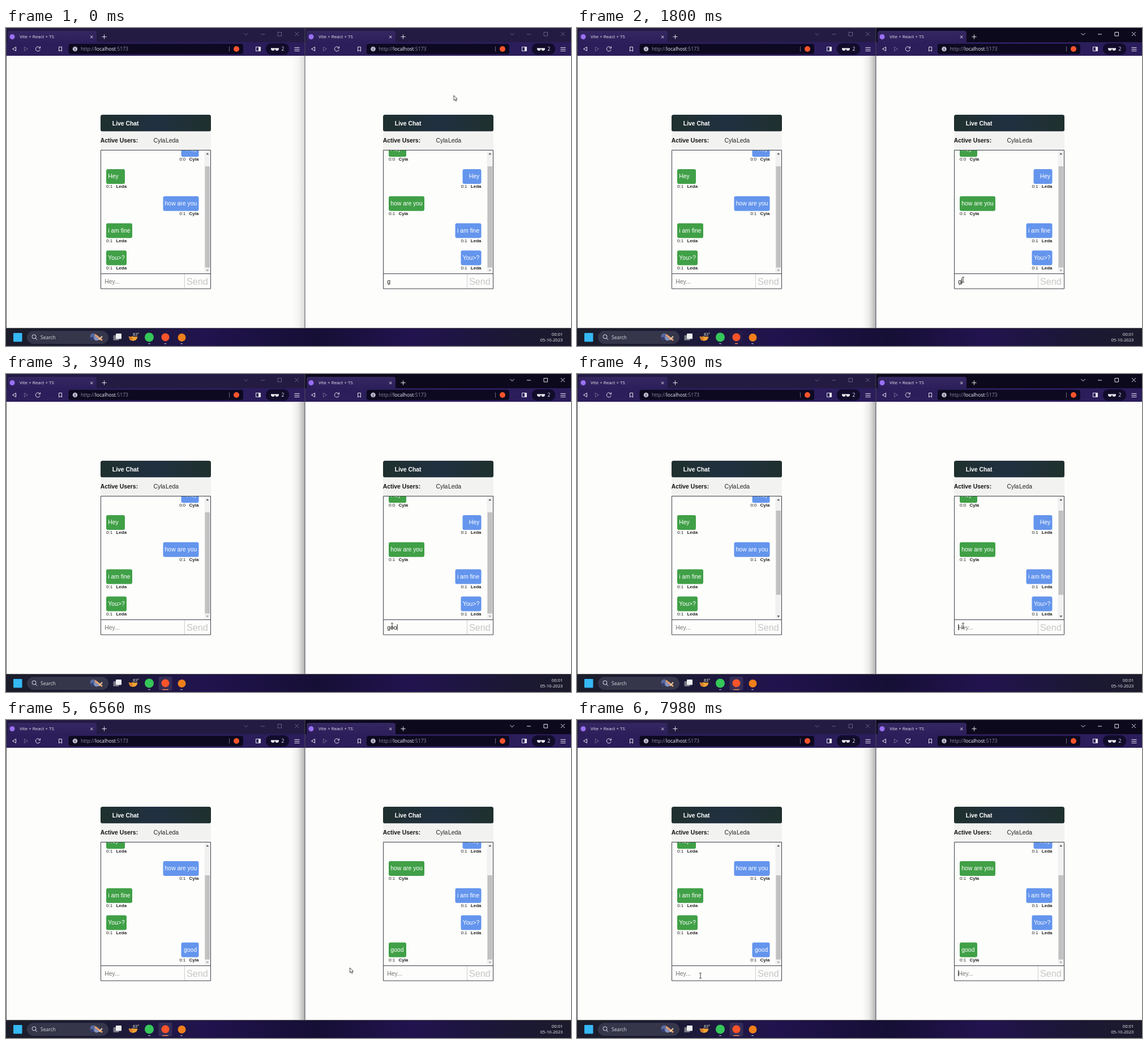
An HTML page for the animation above (8 s loop, 998 by 561 pixels).

```html
<!DOCTYPE html>
<html lang="en">
<head>
<meta charset="utf-8">
<title>Live chat</title>
<style>
html, body { margin: 0; width: 100%; height: 100%; overflow: hidden; background: #fdfdfc; }
svg { display: block; width: 998px; height: 561px; }
text { font: 10.4px "Liberation Sans", Arial, sans-serif; white-space: pre; }
.ui { font-family: "Open Sans", "Noto Sans", sans-serif; }
.bold { font-weight: bold; }
.meta { font-size: 8px; }
.line { fill: none; stroke: #e4e2ee; stroke-width: 1; }
</style>
</head>
<body>
<svg id="stage" viewBox="0 0 998 561" xmlns="http://www.w3.org/2000/svg"></svg>
<script>
const LOOP = 8000;
const FOCUS = 1740, SENT = 5240, SCROLL = [5310, 5690];
const STEP = 47.8;
const USERS = ['Cyla', 'Leda'];
const MIN_WIDTH = [31, 33];

// sender, text, time, bubble width
const MESSAGES = [
  [0, 'Hey', '0:0'],
  [1, 'Hey', '0:1'],
  [0, 'how are you', '0:1', 63],
  [1, 'i am fine', '0:1', 46],
  [1, 'You>?', '0:1', 36],
  [0, 'good', '0:1'],
];
const TYPING = [[0, 'g'], [3460, 'go'], [3720, 'goo'], [4120, 'good'], [SENT, '']];
const CARET_RESETS = [FOCUS, 3460, 3720, 4120, 4940];
const POINTER = [
  [0, 791, 119], [300, 791, 119], [1560, 682, 444], [6240, 682, 444],
  [6560, 607.5, 437], [7480, 218, 451], [LOOP, 218, 451],
];

const rect = (x, y, w, h, fill, r = 0, extra = '') =>
  `<rect x="${x}" y="${y}" width="${w}" height="${h}" rx="${r}" fill="${fill}" ${extra}/>`;
const dot = (x, y, r, fill) => `<circle cx="${x}" cy="${y}" r="${r}" fill="${fill}"/>`;
const path = (d, extra = '') => `<path class="line" d="${d}" ${extra}/>`;
const shape = (d, fill, extra = '') => `<path d="${d}" fill="${fill}" ${extra}/>`;
const text = (x, y, str, fill, cls = '', extra = '') =>
  `<text x="${x}" y="${y}" fill="${fill}" class="${cls}" ${extra}>${str}</text>`;
const size = px => `style="font-size:${px}px"`;
const escapeText = str => str.replace('>', '&gt;');

function controls(id) {
  return `<g id="controls${id}" stroke-opacity=".35">` +
    path('M420.5 9l3.5 3.5l3.500-3.500M450 11h7M480 7.500h6.500v6.500h-6.500zM510 7l7 7M517 7l-7 7') + '</g>';
}

function browser(id, x, width, rightShift) {
  const leftItems =
    rect(3, 5, 157, 22, 'url(#tab)', 4) +
    dot(11, 15.500, 4.5, '#9a70f4') +
    text(24, 18.300, 'Vite + React + TS', '#e6e3f0', 'ui', size(8)) +
    path('M149 13.500l4.500 4.500M153.500 13.500l-4.500 4.500') +
    path('M169.500 15.500h8M173.500 11.500v8') +
    rect(0, 25, width, 24, 'url(#toolbar)') +
    path('M17.500 33.500v7l-6-3.500z') +
    path('M32.500 33.500v7l6-3.500z', 'stroke-opacity=".35"') +
    path('M59.500 34.500a4 4 0 1 0 .7 3.500M60.500 32.500v3h-3') +
    path('M93.500 33.500h5v7.500l-2.500-2l-2.500 2z');
  const barStart = id ? 109 : 110.500, barEnd = 419 + rightShift - x;
  const shift = id ? -1.5 : 0;
  const address =
    rect(barStart, 28, barEnd - barStart, 18, '#0c0920', 4) +
    dot(122 + shift, 37, 4.300, '#bdbac9') +
    rect(121.500 + shift, 36.500, 1, 3, '#17112f') + rect(121.500 + shift, 34.500, 1, 1, '#17112f') +
    text(132 + shift, 40.300, 'http://<tspan fill="#f3f2f8">localhost</tspan>:5173', '#918da6', 'ui', size(8.700));
  const rightItems =
    path('M394.500 32.500v9', 'stroke-opacity=".45"') +
    dot(407, 37, 5, '#fb542b') +
    path('M441.500 33.500h8v7h-8z') + rect(446, 33.500, 3.500, 7, '#e4e2ee') +
    rect(459, 27, 41, 20, '#120c2b', 9) +
    shape('M468 35.500h14v1.500q-.5 3-3.500 3t-3-3h-1q0 3-3 3t-3.500-3z', '#f3f2f8') +
    text(486.500, 40, '2', '#f3f2f8', 'ui', size(8.500)) +
    path('M509.500 34.500h9M509.500 37.500h9M509.500 40.500h9') + controls(id);
  return rect(x, 0, width, 530, '#fdfdfc') +
    rect(x, 0, width, 26, '#231b42', 0, `id="strip${id}"`) +
    `<g transform="translate(${x})">${leftItems}${address}</g>` +
    `<g transform="translate(${rightShift})">${rightItems}</g>`;
}

function message([sender, body, time, width = MIN_WIDTH[sender]], index, viewer) {
  const mine = sender === viewer;
  const y = 201.200 + index * STEP;
  const x = mine ? 340.500 - width : 177;
  const edge = mine ? 340.500 : 177;
  const anchor = mine ? 'text-anchor="end"' : '';
  return rect(x, y, width, 26, mine ? '#6495ed' : '#40a047', 3) +
    text(mine ? edge - 3.300 : edge + 3.300, y + 16.200, escapeText(body), '#fff', '', anchor) +
    text(edge, y + 33.200, `${time}<tspan class="meta bold" dx="6.300" font-weight="bold">${USERS[sender]}</tspan>`,
      '#222', 'meta', anchor);
}

function chat(viewer, x) {
  const list = MESSAGES.map((m, i) =>
    `<g ${i === 5 ? `id="reply${viewer}"` : ''}>${message(m, i, viewer)}</g>`).join('');
  return `<g transform="translate(${x})">` +
    rect(167, 153, 195, 29.500, 'url(#header)', 3.500) +
    text(187.800, 171.700, 'Live Chat', '#fff', 'bold') +
    rect(167, 182.500, 195, 33, '#f2f2f1') +
    text(166.700, 202.200, 'Active Users:', '#151515', 'bold') +
    text(260.500, 202.200, USERS[0], '#222') + text(282, 202.200, USERS[1], '#222') +
    rect(167.500, 215.500, 194, 244.500, '#fdfdfc') +
    `<g clip-path="url(#messages)"><g id="list${viewer}">${list}</g></g>` +
    rect(350.500, 216, 10.500, 217.500, '#f1f1f1') +
    rect(351.500, 244, 8.500, 178, '#c1c1c1', 0, `id="thumb${viewer}"`) +
    shape('M353.300 223.200l2.500-3l2.500 3z', '#505050') +
    shape('M353.300 426.200l2.500 3l2.500-3z', '#a3a3a3', `id="down${viewer}"`) +
    path('M315.500 434v26', 'style="stroke:#cfcfcf"') +
    path('M167 433.500h195M167.500 215.500h194v244.500h-194z', 'style="stroke:#3c4247"') +
    text(319, 452.600, 'Send', '#c6c6c6', '', size(16.200)) +
    text(174.300, 450.500, 'Hey...', '#757575', '', `id="input${viewer}"`) + '</g>';
}

function taskbar() {
  const running = [253, 281.500, 310].map((x, i) =>
    rect(x - 2, 556, 4, 1.500, '#9b9ba8', .7, i === 1 ? 'id="underline"' : '')).join('');
  return rect(0, 530, 998, 31, 'url(#taskbar)') +
    rect(0, 529, 998, 1, '#5d5b55') +
    rect(13, 538, 15.500, 15.500, '#35b8f3', 1) +
    rect(37.500, 535, 143, 21.500, '#35364a', 10.700, 'stroke="#484960" stroke-width=".6"') +
    '<circle class="line" cx="49.500" cy="544.500" r="3.500"/>' + path('M52 547l3 3.500') +
    text(61, 549.300, 'Search', '#d9d9e0', 'ui', size(8.500)) +
    dot(154, 544, 5.500, '#59699f') + dot(160, 547, 4.500, '#8591bf') + dot(152, 548, 3, '#353e70') +
    path('M157 541l13 10', 'style="stroke:#e39b68;stroke-width:3"') +
    path('M164 550l6-6', 'style="stroke:#f2d1ac;stroke-width:2"') +
    rect(189.500, 542, 10, 9, '#777984', 1) + rect(194, 539, 10, 9.500, '#eeeef2', 1) +
    shape('M216.500 544q6 2 9-2q4 2 7-1q1 10-8 11q-6 0-8-8z', '#f2a333') +
    dot(221, 548, 3, '#d9822b') +
    rect(222.500, 535.500, 14, 9, '#1b1935', 4) +
    text(224, 542.700, '83°', '#fff', 'ui', size(7)) +
    rect(269.500, 534, 24, 24, '#fff', 3, 'id="highlight" opacity="0"') +
    dot(253, 545.500, 8, '#35c759') + dot(281.500, 545.500, 7, '#fb542b') + dot(310.500, 546, 7, '#ef7f1a') +
    running +
    text(983.500, 542.800, '00:01', '#f1f1f5', 'ui', `text-anchor="end" ${size(7.700)}`) +
    text(983.500, 553, '05-10-2023', '#f1f1f5', 'ui', `text-anchor="end" ${size(7.700)}`);
}

function gradient(id, stops, attrs = '') {
  return `<linearGradient id="${id}" ${attrs}>` + stops.map(([at, color, alpha = 1]) =>
    `<stop offset="${at}" stop-color="${color}" stop-opacity="${alpha}"/>`).join('') + '</linearGradient>';
}

const $ = id => document.getElementById(id);

$('stage').innerHTML = '<defs>' +
  gradient('tab', [[0, '#352761'], [1, '#2c1e5a']], 'x2="0" y2="1"') +
  gradient('toolbar', [[0, '#2c1e5a'], [1, '#2b1d5b']]) +
  gradient('header', [[0, '#1f302e'], [.5, '#213041'], [1, '#1f302e']]) +
  gradient('taskbar', [[0, '#1b1d2b'], [.18, '#1c1b35'], [.35, '#21134e'], [.55, '#160f35'], [.72, '#22134f'], [.9, '#1b1833'], [1, '#1c1b2c']]) +
  gradient('shadow', [[0, '#000', 0], [.5, '#000', .07], [1, '#000', .3]]) +
  '<clipPath id="messages"><rect x="168" y="216" width="183" height="217"/></clipPath></defs>' +
  browser(0, 0, 528, 0) + chat(0, 0) +
  rect(504, 49, 24, 480, 'url(#shadow)', 0, 'id="shadow-edge"') +
  browser(1, 528, 470, 470) + chat(1, 499) +
  rect(0, 0, 1, 530, '#4d4b51') + rect(527.500, 0, 1, 530, '#4b4956') + taskbar() +
  rect(0, 441.500, 1, 10.500, '#111', 0, 'id="caret"') +
  '<g id="pointer"><g id="arrow">' +
  shape('M0 0v8.800l2-1.900l1.400 3.200l1.500-.7l-1.400-3h2.600z', '#fff', 'stroke="#222" stroke-width=".8"') +
  '</g><g id="beam">' +
  path('M-2 -4.500h1.300l.7 .6l.7-.6h1.300M0 -4v8M-2 4.500h1.300l.7-.6l.7 .6h1.300', 'style="stroke:#222;stroke-width:.9"') +
  '</g></g>';

const clamp = v => Math.min(1, Math.max(0, v));
const ease = v => v * v * (3 - 2 * v);
const show = (id, on) => $(id).style.display = on ? '' : 'none';
const set = (id, attrs) => Object.entries(attrs).forEach(([k, v]) => $(id).setAttribute(k, v));

function pointerAt(t) {
  const i = Math.max(1, POINTER.findIndex(p => p[0] > t));
  const [t0, x0, y0] = POINTER[i - 1], [t1, x1, y1] = POINTER[i];
  const k = ease(clamp((t - t0) / (t1 - t0)));
  return [x0 + (x1 - x0) * k, y0 + (y1 - y0) * k];
}

function draw(t) {
  const active = t >= FOCUS, sent = t >= SENT;

  set('strip1', { fill: active ? '#0d091d' : '#231b42' });
  set('controls1', { 'stroke-opacity': active ? 1 : .35 });
  set('shadow-edge', { opacity: active ? 1 : .45 });
  const grow = ease(clamp((t - FOCUS) / 200));
  const width = 4 + 7 * grow;
  set('underline', { x: 281.500 - width / 2, width, fill: active ? '#f0895c' : '#9b9ba8' });
  set('highlight', { opacity: .1 * grow });

  const scroll = ease(clamp((t - SCROLL[0]) / (SCROLL[1] - SCROLL[0])));
  for (const id of [0, 1]) {
    set('list' + id, { transform: `translate(0 ${-STEP * scroll})` });
    set('thumb' + id, sent ? { y: 241 + 33 * scroll, height: 148.500 } : { y: 244, height: 178.500 });
    set('down' + id, { fill: sent && scroll < 1 ? '#505050' : '#a3a3a3' });
    show('reply' + id, sent);
  }

  const typed = TYPING.filter(s => s[0] <= t).pop()[1];
  const input = $('input1');
  input.textContent = typed || 'Hey...';
  input.setAttribute('fill', typed ? '#151515' : '#757575');
  const reset = CARET_RESETS.filter(s => s <= t).pop();
  show('caret', active && Math.floor((t - reset) / 500) % 2 === 0);
  set('caret', { x: 673.300 + (typed ? input.getComputedTextLength() : 0) });

  const [x, y] = pointerAt(t);
  const inField = y > 434 && y < 460 && [167, 666].some(left => x > left && x < left + 148);
  set('pointer', { transform: `translate(${x} ${y})` });
  show('arrow', !inField);
  show('beam', inField);
}

const start = performance.now();
function tick() {
  draw((performance.now() - start) % LOOP);
  requestAnimationFrame(tick);
}
tick();
</script>
</body>
</html>
```
